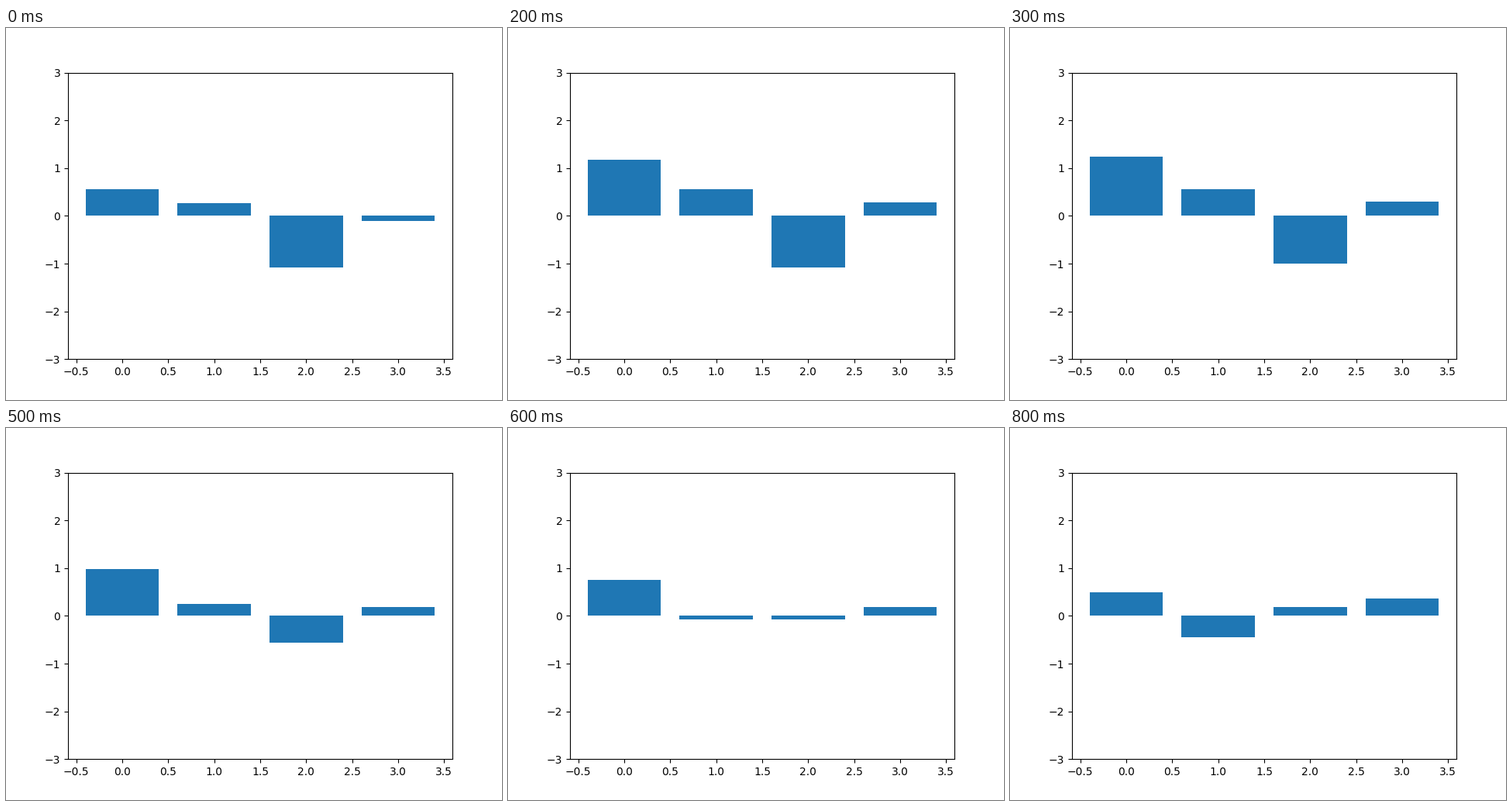
Write a matplotlib script that moves like this. It is 640 by 480 pixels and loops after 900 ms.

```python
import matplotlib.pyplot as plt
import numpy as np
from matplotlib.animation import FuncAnimation

STEPS = 9
STEP_MS = 100

# Key steps, and the bar heights at each of them
KEYS = np.array([0, 2, 5, 6, 8])
LEVELS = np.array([
    (0.56, 0.27, -1.08, -0.11),
    (1.175, 0.56, -1.08, 0.28),
    (0.98, 0.25, -0.56, 0.185),
    (0.755, -0.075, -0.075, 0.185),
    (0.495, -0.45, 0.185, 0.365),
])
SLOPES = np.gradient(LEVELS, KEYS, axis=0, edge_order=2)


def heights(step):
    """Smooth cubic curve through the key heights."""
    i = min(np.searchsorted(KEYS, step, side="right"), len(KEYS) - 1) - 1
    span = KEYS[i + 1] - KEYS[i]
    u = (step - KEYS[i]) / span
    ease = u * u * (3 - 2 * u)
    base = LEVELS[i] + (LEVELS[i + 1] - LEVELS[i]) * ease
    bend = (1 - u) * SLOPES[i] - u * SLOPES[i + 1]
    return base + span * u * (1 - u) * bend


fig, ax = plt.subplots(figsize=(6.4, 4.8), dpi=100)
bars = ax.bar(range(4), heights(0), color="#1f77b4")
ax.set_ylim(-3, 3)


def update(step):
    for bar, height in zip(bars, heights(step)):
        bar.set_height(height)
    return bars.patches


anim = FuncAnimation(fig, update, frames=STEPS, interval=STEP_MS,
                     repeat=True, repeat_delay=0)
plt.show()
```
